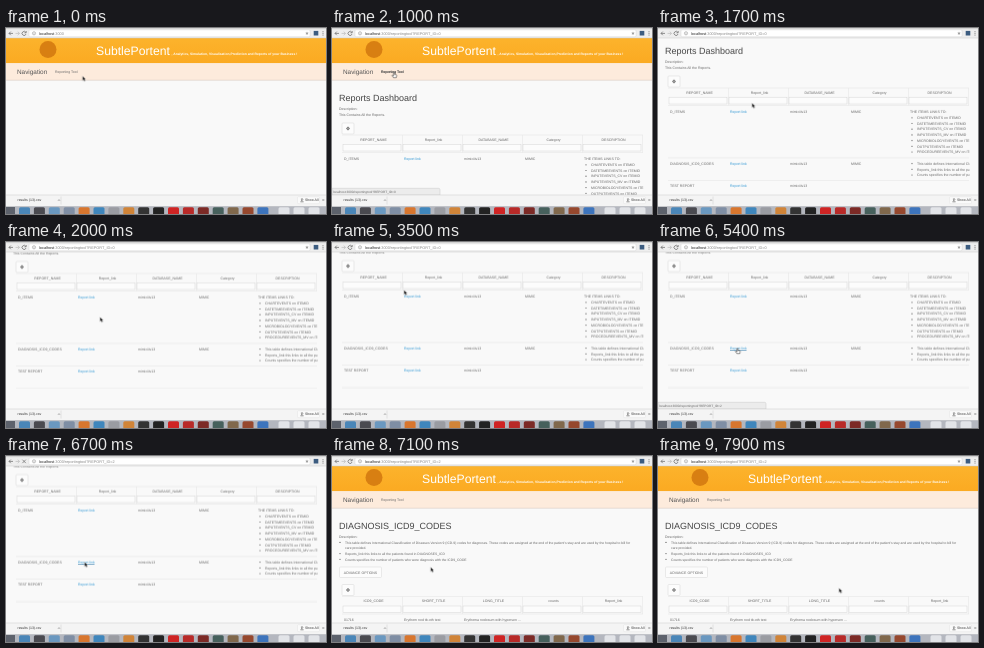
An HTML page for the animation above (8000 ms loop, 320 by 186 pixels).

```html
<!DOCTYPE html>
<html lang="en">
<head>
<meta charset="utf-8">
<title>Reports Dashboard</title>
<style>
html, body { margin: 0; width: 100%; height: 100%; overflow: hidden; background: #fff; }
svg { display: block; width: 100vw; height: 100vh; font-family: "Liberation Sans", Arial, sans-serif; text-rendering: geometricPrecision; }
text { fill: #666; font-size: 3.5px; white-space: pre; }
.url { font-size: 3.85px; fill: #888; }
.url .host { fill: #222; }
.brand { font-size: 12.2px; fill: #fff; }
.tagline { font-size: 3.35px; font-weight: bold; fill: #fff; }
.nav { font-size: 6.4px; fill: #555; }
.title { font-size: 9px; fill: #444; }
.small { font-size: 3.35px; }
.status { font-size: 3.2px; }
.mid { text-anchor: middle; }
.link { fill: #2a94d2; }
.dark { fill: #333; }
.line { stroke: #e2e2e2; stroke-width: .5; fill: none; }
.box { fill: #fcfcfc; stroke: #d6d6d6; stroke-width: .5; }

.anim { animation: 8s infinite both step-end; }
.home { animation-name: home; }
.list { animation-name: list; }
.codes { animation-name: codes; }
.loading { animation-name: loading; }
.idle { animation-name: idle; }
.hand, .bubble { animation-name: hover; }
.arrow { animation-name: arrow; }
.hoverNav { animation-name: hoverNav; }
.hoverTop { animation-name: hoverTop; }
.hoverRow { animation-name: hoverRow; }
.urlHome { animation-name: urlHome; }
.urlList { animation-name: urlList; }
.urlCodes { animation-name: urlCodes; }
.toList { animation-name: toList; }
.toCodes { animation-name: toCodes; }
.scroll { animation: scroll 8s infinite linear both; }
.pointer { animation: move 8s infinite ease-in-out both; }

@keyframes home { 0% { opacity: 1 } 8.75%, 100% { opacity: 0 } }
@keyframes list { 0% { opacity: 0 } 8.75% { opacity: 1 } 87.5%, 100% { opacity: 0 } }
@keyframes codes { 0% { opacity: 0 } 87.5%, 100% { opacity: 1 } }
@keyframes urlHome { 0% { opacity: 1 } 6.25%, 100% { opacity: 0 } }
@keyframes urlList { 0% { opacity: 0 } 6.25% { opacity: 1 } 78.75%, 100% { opacity: 0 } }
@keyframes urlCodes { 0% { opacity: 0 } 78.75%, 100% { opacity: 1 } }
@keyframes loading { 0% { opacity: 0 } 6.25% { opacity: 1 } 8.75% { opacity: 0 } 78.75% { opacity: 1 } 87.5%, 100% { opacity: 0 } }
@keyframes idle { 0% { opacity: 1 } 6.25% { opacity: 0 } 8.75% { opacity: 1 } 78.75% { opacity: 0 } 87.5%, 100% { opacity: 1 } }
@keyframes hover { 0% { opacity: 0 } 3.75% { opacity: 1 } 15% { opacity: 0 } 47.5% { opacity: 1 } 52.5% { opacity: 0 } 61.25% { opacity: 1 } 78.75%, 100% { opacity: 0 } }
@keyframes arrow { 0% { opacity: 1 } 3.75% { opacity: 0 } 15% { opacity: 1 } 47.5% { opacity: 0 } 52.5% { opacity: 1 } 61.25% { opacity: 0 } 78.75%, 100% { opacity: 1 } }
@keyframes hoverNav { 0% { opacity: 0 } 3.75% { opacity: 1 } 15%, 100% { opacity: 0 } }
@keyframes hoverTop { 0% { opacity: 0 } 47.5% { opacity: 1 } 52.5%, 100% { opacity: 0 } }
@keyframes hoverRow { 0% { opacity: 0 } 61.25% { opacity: 1 } 87.5%, 100% { opacity: 0 } }
@keyframes toList { 0% { opacity: 1 } 60%, 100% { opacity: 0 } }
@keyframes toCodes { 0% { opacity: 0 } 60%, 100% { opacity: 1 } }
@keyframes scroll {
  0%, 16.25% { transform: translateY(0); animation-timing-function: ease-in-out }
  25% { transform: translateY(-75.5px) }
  27.5%, 100% { transform: translateY(-76.5px) }
}
@keyframes move {
  0% { transform: translate(76.5px, 48px) }
  5%, 12.5% { transform: translate(62px, 44.5px) }
  20%, 27.5% { transform: translate(94px, 75px) }
  43.75% { transform: translate(72px, 48px) }
  47.5%, 51.25% { transform: translate(75px, 53px) }
  61.25%, 67.5% { transform: translate(79.5px, 106.5px) }
  78.75%, 86% { transform: translate(78.5px, 106px) }
  95%, 100% { transform: translate(181px, 132px) }
}
</style>
</head>
<body>
<svg viewBox="0 0 320 186" preserveAspectRatio="none">
  <defs>
    <clipPath id="view"><rect y="10" width="320" height="157"/></clipPath>
    <clipPath id="cells"><rect x="10" y="0" width="301.5" height="260"/></clipPath>
    <linearGradient id="gold" x2="0" y2="1">
      <stop stop-color="#fcb32c"/><stop offset="1" stop-color="#fbaa22"/>
    </linearGradient>
    <g id="banner">
      <rect y="10" width="320" height="25.3" fill="url(#gold)"/>
      <circle cx="42" cy="21.5" r="8.5" fill="#d87f12"/>
      <text class="brand" x="90" y="27">SubtlePortent</text>
      <text class="tagline" x="165.5" y="27">, Analytics, Simulation, Visualisation,Prediction and Reports of your Business !</text>
      <rect y="35.3" width="320" height="16.7" fill="#fdebdc"/>
      <path d="M0 52.2H320" stroke="#d9c9bc" stroke-width=".6"/>
      <text class="nav" x="11" y="46.3">Navigation</text>
      <text x="49" y="45.4">Reporting Tool</text>
    </g>
    <g id="tool">
      <rect class="box" x="10" y="-5.5" width="12" height="11" rx="1"/>
      <circle cx="16" r="1.2" fill="none" stroke="#777" stroke-width=".9"/>
      <path d="M16 -2V2M14 0H18" stroke="#777" stroke-width=".5"/>
    </g>
  </defs>

  <rect width="320" height="186" fill="#f9f9f9"/>
  <g clip-path="url(#view)">
    <g class="anim home"><use href="#banner"/></g>
    <g class="anim list"><g class="scroll" id="list"></g></g>
    <g class="anim codes" id="codes"></g>
    <g class="anim hoverNav"><g class="scroll"><text class="dark" x="49" y="45.4">Reporting Tool</text></g></g>
  </g>

  <g class="anim bubble">
    <path d="M0 160.3H106.5Q108 160.3 108 161.8V167H0Z" fill="#ececec" stroke="#c8c8c8" stroke-width=".5"/>
    <text class="status anim toList" x="1" y="164.8">localhost:3000/reportingtool?REPORT_ID=0</text>
    <text class="status anim toCodes" x="1" y="164.8">localhost:3000/reportingtool?REPORT_ID=2</text>
  </g>

  <rect width="320" height="10" fill="#eeeeee"/>
  <rect width="320" height="1.2" fill="#d2d2d2"/>
  <rect x="23" y="1.8" width="281" height="7" rx="1" fill="#fff" stroke="#d0d0d0" stroke-width=".4"/>
  <path d="M0 10H320" stroke="#c8c8c8" stroke-width=".5"/>
  <g fill="none" stroke="#666" stroke-width=".7">
    <path d="M7 5.4H3M4.8 3.6L3 5.4L4.8 7.2"/>
    <path d="M9.5 5.4H13.5M11.7 3.6L13.5 5.4L11.7 7.2" stroke="#bbb"/>
    <path class="anim idle" d="M19.8 4.4A2 2 0 1 0 20 6M20.2 3V4.8H18.4"/>
    <path class="anim loading" d="M16.4 3.7L19.8 7.1M19.8 3.7L16.4 7.1"/>
    <circle cx="28" cy="5.3" r="1.6" stroke="#888" stroke-width=".5"/>
    <path d="M28 5V6.2M28 4.2V4.6" stroke="#888" stroke-width=".5"/>
  </g>
  <g id="address"></g>
  <path d="M301 3.5L301.5 4.8H302.8L301.8 5.6L302.2 7L301 6.1L299.8 7L300.2 5.6L299.2 4.8H300.5Z" fill="#999"/>
  <rect x="307.7" y="2.9" width="4.6" height="4.6" fill="#3c5c80"/>
  <path d="M317 3.2V7.6" stroke="#777" stroke-width=".9" stroke-dasharray="1 .7"/>

  <rect y="167" width="320" height="12" fill="#f4f4f4"/>
  <path d="M0 167H320" stroke="#c9c9c9" stroke-width=".5"/>
  <path d="M55 168.5V176.5" stroke="#ccc" stroke-width=".5"/>
  <text class="dark" x="11.5" y="173.4">results (13).csv</text>
  <path d="M52 172.8L53 171.6L54 172.8" fill="none" stroke="#777" stroke-width=".6"/>
  <rect x="291.5" y="168.7" width="22" height="7" rx="1" fill="#fafafa" stroke="#ddd" stroke-width=".4"/>
  <path d="M296 170V172.4M294.9 171.5L296 172.6L297.1 171.5M294.4 173.8H297.6" fill="none" stroke="#444" stroke-width=".6"/>
  <text class="dark" x="299" y="173.4">Show All</text>
  <path d="M316.3 171L318.3 173M318.3 171L316.3 173" stroke="#777" stroke-width=".5"/>

  <rect y="178.7" width="320" height="8" fill="#5d626c"/>
  <rect x="9" y="178.7" width="311" height="8" fill="#b4b7bf"/>
  <g id="dock"></g>

  <g class="pointer"><g transform="scale(.8)">
    <path class="anim arrow" d="M0 0V5.8L1.4 4.6L2.4 6.8L3.4 6.3L2.5 4.2H4.2Z" fill="#111" stroke="#fff" stroke-width=".4"/>
    <path class="anim hand" d="M-.6 0Q0 -.7 .6 0V2.3L3 2.9Q3.5 3.1 3.4 3.8L2.8 6.4H-.7L-2.5 3.7Q-2.2 2.9 -1.5 3.4L-.6 4.2Z" fill="#fff" stroke="#111" stroke-width=".6"/>
  </g></g>
</svg>
<script>
const $ = id => document.getElementById(id);
const txt = (x, y, s, cls = "") => `<text class="${cls}" x="${x}" y="${y + 1.2}">${s}</text>`;
const bullet = (x, y, s, cls) => `<circle cx="${x}" cy="${y}" r=".6" fill="#555"/>` + txt(x + 5, y, s, cls);
const bullets = (x, y, items, cls) => items.map((s, i) => bullet(x, y + i * 5.7, s, cls)).join("");
const rule = y => `<path class="line" d="M10 ${y}H311"/>`;
const colX = i => 12 + i * 60;

// Column headings with a filter field under each
const head = (y, names) => rule(y - 4.5) + names.map((s, i) =>
  txt(colX(i) + 29.5, y, s, "mid") +
  `<rect class="box" x="${colX(i) - 1}" y="${y + 5}" width="58" height="6.5"/>` +
  `<path class="line" d="M${colX(i) + 58.5} ${y - 4.5}v17.5"/>`).join("") + rule(y + 13);

const row = (y, name, category) =>
  txt(12, y, name) + txt(72, y, "Report link", "link") +
  txt(132, y, "mimiciiiv13") + txt(193, y, category);

const underline = (y, cls) =>
  `<g class="anim ${cls}"><path d="M72 ${y + 1.8}H88.5" stroke="#17669c" stroke-width=".5"/></g>`;

const address = (cls, path) =>
  `<text class="url anim ${cls}" x="33" y="6.7"><tspan class="host">localhost</tspan>:3000${path}</text>`;

$("address").innerHTML = address("urlHome", "") +
  address("urlList", "/reportingtool?REPORT_ID=0") +
  address("urlCodes", "/reportingtool?REPORT_ID=2");

const events = ["CHARTEVENTS", "DATETIMEEVENTS", "INPUTEVENTS_CV", "INPUTEVENTS_MV",
  "MICROBIOLOGYEVENTS", "OUTPUTEVENTS", "PROCEDUREEVENTS_MV"].map(s => s + " on ITEMID");
const defines = "This table defines International Classification of Diseases Version 9 (ICD-9) codes for diagnoses.";
const linksTo = "Reports_link this links to all the patients found in DIAGNOSES_ICD";
const counts = "Counts specifies the number of patients who were diagnosis with the ICD9_CODE";

$("list").innerHTML = `<use href="#banner"/>
  <text class="title" x="7" y="73.2">Reports Dashboard</text>` +
  txt(7, 80.5, "Description:") + txt(7, 86.5, "This Contains All the Reports.") +
  `<use href="#tool" y="100.5"/><g clip-path="url(#cells)">` +
  head(111.5, ["REPORT_NAME", "Report_link", "DATABASE_NAME", "Category", "DESCRIPTION"]) +
  row(130.3, "D_ITEMS", "MIMIC") + txt(252, 130.3, "THE ITEMS LINKS TO:") + bullets(254, 136.8, events) +
  rule(176.8) + row(182.6, "DIAGNOSIS_ICD9_CODES", "MIMIC") + bullets(254, 182.6, [defines, linksTo, counts]) +
  rule(199.5) + row(205, "TEST REPORT", "") + rule(222) + "</g>" +
  underline(130.3, "hoverTop") + underline(182.6, "hoverRow");

$("codes").innerHTML = `<use href="#banner"/>
  <text class="title" x="7" y="73.2">DIAGNOSIS_ICD9_CODES</text>` +
  txt(7, 80.5, "Description:") +
  bullet(8, 86.4, defines + " These codes are assigned at the end of the patient's stay and are used by the hospital to bill for", "small") +
  txt(13, 92, "care provided.", "small") + bullets(8, 97.6, [linksTo, counts], "small") +
  `<rect class="box" x="7.5" y="111" width="42" height="10.5" rx="1"/>` + txt(28.5, 116.3, "ADVANCE OPTIONS", "mid") +
  `<use href="#tool" y="134"/>` +
  head(145, ["ICD9_CODE", "SHORT_TITLE", "LONG_TITLE", "counts", "Report_link"]) +
  txt(12, 163.3, "01716") + txt(72, 163.3, "Erythem nod tb-oth test") +
  txt(132, 163.3, "Erythema nodosum with hypersen ...");

const colours = ["#4a86b8", "#4a4a50", "#6a98c0", "#7f8ea4", "#d8762e", "#3f86bc", "#9a9ca2", "#d08438", "#333", "#222",
  "#cf2424", "#b82a28", "#7c2a26", "#46605c", "#80684c", "#96482e", "#3d74bc"];
const icon = (x, colour) => `<rect x="${x - 5.5}" y="179.3" width="11" height="8" rx="1.5" fill="${colour}"/>`;
$("dock").innerHTML = colours.map((c, i) => icon(18.5 + i * 14.9, c)).join("") +
  [278, 293, 308].map(x => icon(x, "#e2e4e8")).join("");
</script>
</body>
</html>
```
